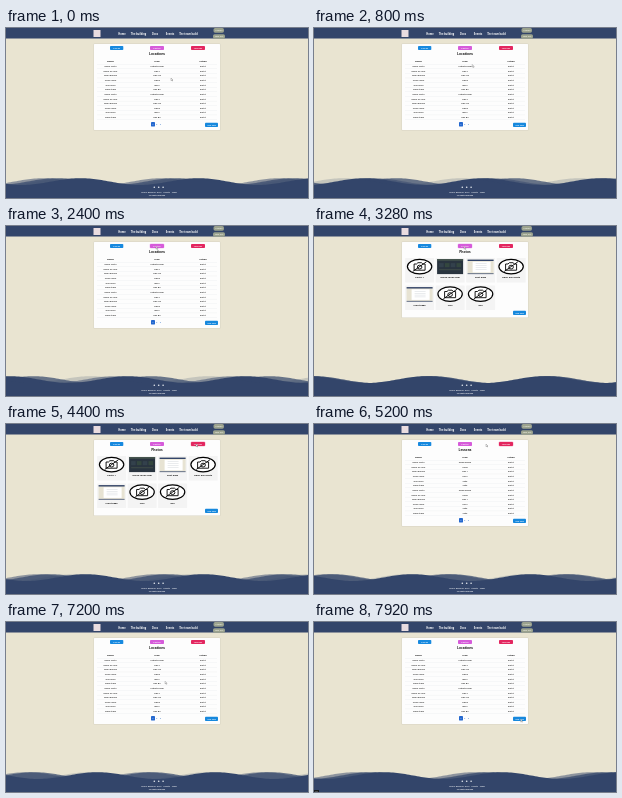
Write an HTML page that moves like this. It is 302 px wide and 170 px high and loops after 8 s.

```html
<!DOCTYPE html>
<html lang="en">
<head>
<meta charset="utf-8">
<title>Club pages</title>
<style>
html, body { margin: 0; width: 100%; height: 100%; overflow: hidden; background: #e9e4d1; }
svg { display: block; width: 100vw; height: 100vh; }
text { font-family: "Open Sans", "Noto Sans", sans-serif; }
</style>
</head>
<body>
<svg id="stage" viewBox="0 0 302 170"></svg>
<script>
const LOOP = 8000, NAVY = '#33456a';
const stage = document.getElementById('stage');

function add(parent, tag, attrs, label) {
  const el = document.createElementNS('http://www.w3.org/2000/svg', tag);
  for (const k in attrs) el.setAttribute(k, attrs[k]);
  if (label) el.textContent = label;
  parent.appendChild(el);
  return el;
}
const group = (parent, attrs = {}) => add(parent, 'g', attrs);
const rect = (p, x, y, width, height, fill, more) =>
  add(p, 'rect', { x, y, width, height, fill, ...more });
const text = (p, x, y, size, fill, label, more) =>
  add(p, 'text', { x, y, 'font-size': size, fill, 'text-anchor': 'middle', 'font-weight': 600, ...more }, label);
const show = (el, on) => el.setAttribute('visibility', on ? 'visible' : 'hidden');

rect(stage, 0, 0, 302, 170, '#e9e4d1');

// Header
rect(stage, 0, 0, 302, 10.5, NAVY);
rect(stage, 87.5, 2, 7, 7, '#e9dce0');
[[116, 'Home'], [132.5, 'The building'], [149, 'Docs'], [164, 'Events'], [182.5, 'The team build']]
  .forEach(([x, s]) => text(stage, x, 6.5, 2.5, '#fff', s, { 'font-weight': 700 }));
rect(stage, 207.5, 0, 10.5, 4.8, '#9ba28e', { rx: 1.7 });
rect(stage, 207, 6.2, 12, 4.6, '#9ba28e', { rx: 1.7 });
text(stage, 213, 3.3, 2.2, '#f4f5ea', 'Profile');
text(stage, 213, 9.3, 2.2, '#f4f5ea', 'Sign out');

// Card
const shadow = rect(stage, 87.5, 15.6, 127, 87, '#d8d4c4', { rx: 0.6 });
const card = rect(stage, 88, 16, 126, 86, '#fdfdfd', { rx: 0.4 });
const tabs = [[104, 13.3, '#1789df', 'Places'], [144, 14, '#d65bda', 'Photos'], [185, 14, '#e3265f', 'Lessons']]
  .map(([x, w, fill, label]) => {
    const box = rect(stage, x, 17.9, w, 4.1, fill, { rx: 0.8, stroke: fill });
    text(stage, x + w / 2, 20.8, 2.2, '#fff', label);
    return { box, mid: x + w / 2 };
  });
const title = text(stage, 151, 26.8, 3.3, '#151515', '', { 'font-weight': 700 });

// Table
const table = group(stage);
const columns = [104.5, 151, 197];
['Name', 'Type', 'Action'].forEach((s, i) =>
  text(table, columns[i], 33.9, 2.3, '#111', s, { 'font-weight': 700 }));
const names = ['Room north', 'Room by river', 'Small garden', 'Open room', 'Side room', 'Main stage'];
const kinds = [['Activity room', 'Hall A', 'Hall A.B', 'Hall B', 'Big A', 'Hall B.C'],
  ['Open lesson', 'K.B.B', 'Day 1', 'K.B.A', 'Auto', 'Auto']];
const kindCells = [];
for (let r = 0; r < 12; r++) {
  const y = 39.2 + r * 4.62;
  rect(table, 91, y - 3.2, 120, 0.25, '#dfe1e4');
  text(table, columns[0], y, 2.1, '#222', names[r % 6]);
  kindCells.push(text(table, columns[1], y, 2.1, '#111', ''));
  text(table, columns[2], y, 2.1, '#222', 'Edit it');
}
rect(table, 91, 91.5, 120, 0.25, '#dfe1e4');
rect(table, 145, 94, 4, 4.4, '#2468cf', { rx: 0.4 });
['1', '2', '3'].forEach((s, i) =>
  text(table, 147 + i * 3.7, 97.1, 2.3, i ? '#3b78c9' : '#fff', s));

// Gallery
const gallery = group(stage);
function noPhoto(p, x, y) {
  const g = group(p, { transform: `translate(${x} ${y})`, fill: '#fff', stroke: '#000', 'stroke-width': 0.9 });
  add(g, 'ellipse', { rx: 12.2, ry: 7.3, 'stroke-width': 1.2 });
  add(g, 'path', { d: 'M-5.5-2.6h2.4l1.4-1.3h3.6l1.4 1.3h2.2v6.2h-11z' });
  add(g, 'ellipse', { cy: 0.5, rx: 2.3, ry: 1.9 });
  add(g, 'path', { d: 'M-6.8 4.8L6.8-4.8' });
}
function darkShot(p, x, y) {
  rect(p, x - 13, y - 7.5, 26, 15, '#29343f');
  rect(p, x - 13, y - 7.5, 26, 1.6, '#46564e');
  for (let i = 0; i < 4; i++) rect(p, x - 11 + i * 5.8, y - 3.5, 4.6, 4, i % 2 ? '#34473f' : '#33414c');
  rect(p, x - 11, y + 3, 22, 0.5, '#53614f');
}
function pageShot(p, x, y) {
  rect(p, x - 13, y - 7, 26, 14.5, '#e7e3d3');
  rect(p, x - 13, y - 7, 26, 1.4, NAVY);
  rect(p, x - 8, y - 4.8, 18, 10.6, '#fff');
  for (let i = 0; i < 4; i++) rect(p, x - 5, y - 3 + i * 1.9, 11, 0.3, '#b9bec6');
  rect(p, x - 13, y + 6.8, 26, 0.7, NAVY);
}
[[noPhoto, 'Photo 1'], [darkShot, 'Green room view'], [pageShot, 'First page'], [noPhoto, 'Open day photo'],
  [pageShot, 'Front page'], [noPhoto, 'Hall'], [noPhoto, 'Day']].forEach(([draw, label], i) => {
  const x = 105.6 + (i % 4) * 30.5, y = 40.6 + (i > 3) * 27.5;
  rect(gallery, x - 14.5, y - 8.7, 29, 24.5, '#f4f4f4', { rx: 0.5 });
  draw(gallery, x, y);
  text(gallery, x, y + 11.8, 2.3, '#111', label, { 'font-weight': 700 });
});

const addButton = group(stage);
rect(addButton, 199, 0, 13, 4.2, '#1688dd', { rx: 0.8 });
text(addButton, 205.5, 2.9, 2.1, '#fff', 'Add new');

// Footer: equal waves drifting in opposite directions
const PERIOD = 118;
let waveShape = `M${-PERIOD} 160`;
for (let x = -PERIOD; x <= 302 + PERIOD; x += 2)
  waveShape += `L${x} ${(153.6 - 3.4 * Math.cos((x + 3) / PERIOD * 2 * Math.PI)).toFixed(2)}`;
waveShape += 'V160Z';
const waves = [[4000, 1, 0.5], [3000, 1, 0.7], [4000, -1, 1], [3000, -1, 0.2]]
  .map(([span, dir, opacity]) => ({ span, dir, el: add(stage, 'path', { d: waveShape, fill: NAVY, opacity }) }));
rect(stage, 0, 159, 302, 11, NAVY);
[148.3, 152.7, 157.1].forEach(x =>
  add(stage, 'circle', { cx: x, cy: 159.2, r: 0.8, fill: '#e8ecf2' }));
['Home', 'Building', 'Docs', 'Events', 'Team'].forEach((s, i) =>
  text(stage, 138 + i * 7.6, 164.6, 2, '#f0f2f6', s));
text(stage, 151, 168.2, 1.9, '#fff', 'All rights reserved');

const status = group(stage);
rect(status, 0, 168, 5, 2, '#17191d');
text(status, 2.3, 169.5, 1.2, '#aaa', '/new');

const cursor = add(stage, 'path', {
  d: 'M0 0V2.7L.7 2.1 1.2 3.1 1.6 2.9 1.2 2H2Z', fill: '#fff', stroke: '#333', 'stroke-width': 0.25
});

// Page loads: start, view, title, table kind
const pages = [
  { at: -1370, title: 'Locations', kind: 0 },
  { at: 3200, title: 'Photos', gallery: true },
  { at: 4640, title: 'Lessons', kind: 1 },
  { at: 6400, title: 'Locations', kind: 0 }
];
const track = [[0, 165, 50], [900, 158, 36], [1680, 143, 18], [2300, 150, 20.5], [3500, 150, 20.5],
  [4240, 190, 20], [4880, 190, 20], [5200, 172, 20], [6000, 110, 20], [6700, 110, 20],
  [7680, 205, 96], [8000, 207, 97.5]];

function pointer(t) {
  const i = track.findIndex(k => k[0] > t);
  const [a, b] = [track[i - 1], track[i]];
  const u = (t - a[0]) / (b[0] - a[0]), e = u * u * (3 - 2 * u);
  return [a[1] + (b[1] - a[1]) * e, a[2] + (b[2] - a[2]) * e];
}

let current;
function openPage(page) {
  current = page;
  const height = page.gallery ? 75.5 : 86;
  card.setAttribute('height', height);
  shadow.setAttribute('height', height + 1);
  show(table, !page.gallery);
  show(gallery, page.gallery);
  title.textContent = page.title;
  addButton.setAttribute('transform', `translate(0 ${page.gallery ? 84.8 : 94.8})`);
  if (!page.gallery) kindCells.forEach((c, i) => { c.textContent = kinds[page.kind][i % 6]; });
}

function draw(t) {
  const page = pages.filter(p => p.at <= t).pop();
  if (page !== current) openPage(page);
  // The first page stands still while the next one loads.
  const age = (page === pages[0] ? Math.min(t, 2800) : t) - page.at;
  waves.forEach(w =>
    w.el.setAttribute('transform', `translate(${w.dir * PERIOD * (age % w.span) / w.span} 0)`));
  const [x, y] = pointer(t);
  cursor.setAttribute('transform', `translate(${x} ${y})`);
  tabs.forEach(({ box, mid }) => {
    const hot = y < 24 && Math.abs(x - mid) < 20.5;
    box.setAttribute('stroke-width', hot ? 0.3 : 0);
  });
  show(status, t >= 7680);
}

const start = performance.now();
function tick(now) {
  draw(Math.max(0, now - start) % LOOP);
  requestAnimationFrame(tick);
}
draw(0);
requestAnimationFrame(tick);
</script>
</body>
</html>
```
